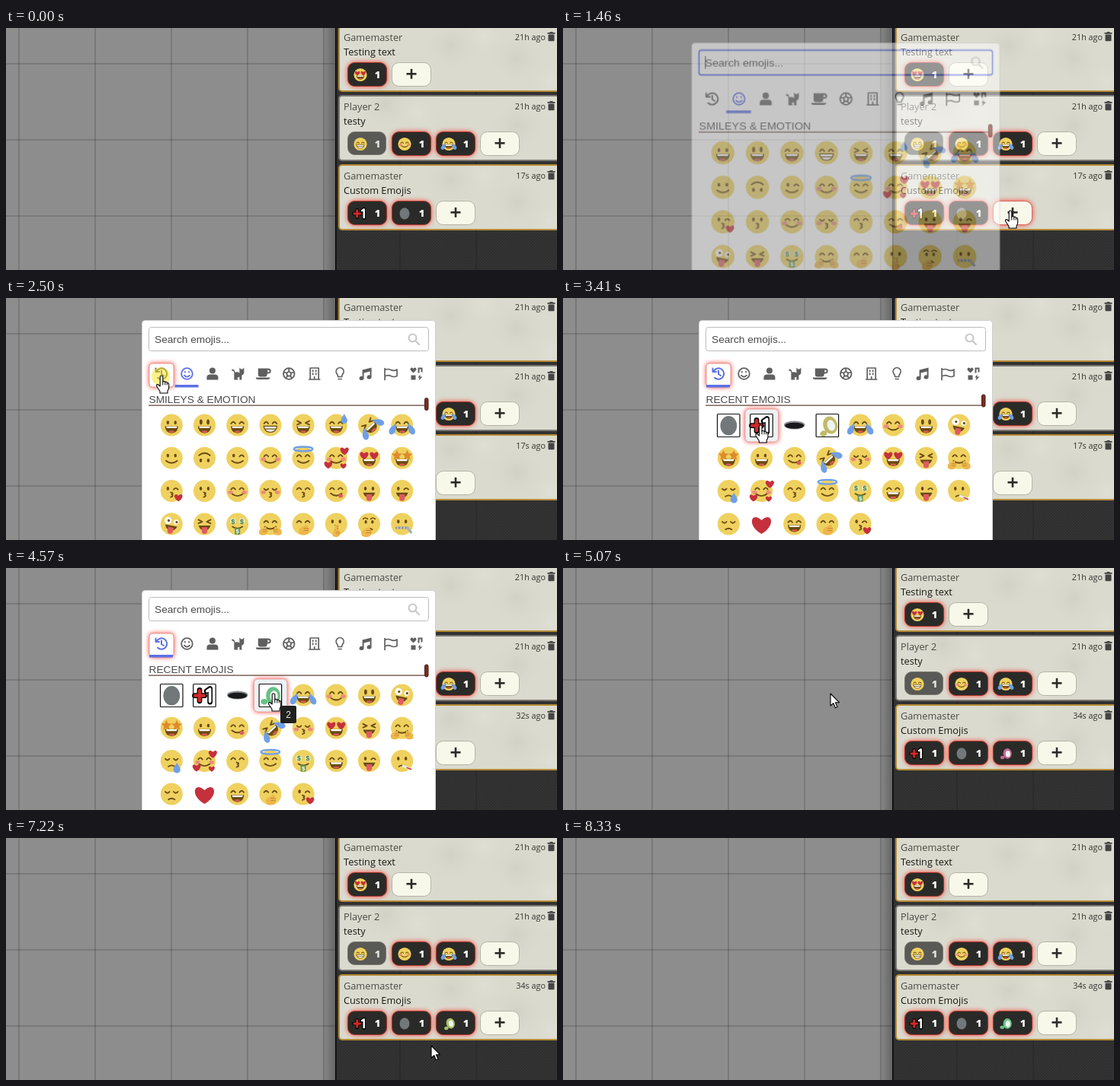
Recreate the animation shown at these times as an HTML page with a canvas. Size 723 px wide and 318 px high, loop 8.4 s.

```html
<!DOCTYPE html>
<html lang="en">
<head>
<meta charset="utf-8">
<title>Emoji reactions</title>
<style>
html, body { margin: 0; width: 100%; height: 100%; overflow: hidden; background: #8d8d8d; }
canvas { display: block; }
</style>
</head>
<body>
<canvas id="stage" width="723" height="318"></canvas>
<script>
const W = 723, H = 318, LOOP = 8400, TAU = Math.PI * 2;
const UI = '"Open Sans", "Noto Sans", sans-serif', ARIAL = '"Liberation Sans", Arial, sans-serif';
const BROWN = '#6a4b14', RED = '#c5303c', TEAR = '#6f9fe8', YELLOW = '#efd15f', BLUE = '#5c70e6';
const stage = document.getElementById('stage').getContext('2d');
const layer = newCanvas(W, H);
let g = stage, now = 0;

function newCanvas(w, h) {
  const ctx = document.createElement('canvas').getContext('2d');
  ctx.canvas.width = w;
  ctx.canvas.height = h;
  return ctx;
}

function text(s, x, y, font, color, align = 'left') {
  g.font = font;
  g.fillStyle = color;
  g.textAlign = align;
  g.fillText(s, x, y);
}

function rect(x, y, w, h, color) {
  g.fillStyle = color;
  g.fillRect(x, y, w, h);
}

function box(x, y, w, h, r, fill, line, lw = 1, glow = 0) {
  g.beginPath();
  g.roundRect(x, y, w, h, r);
  g.fillStyle = fill;
  g.shadowColor = '#ff2a1c';
  g.shadowBlur = glow;
  g.fill();
  g.shadowBlur = 0;
  if (line) {
    g.strokeStyle = line;
    g.lineWidth = lw;
    g.stroke();
  }
}

function disc(x, y, rx, ry, color) {
  g.beginPath();
  g.ellipse(x, y, rx, ry, 0, 0, TAU);
  g.fillStyle = color;
  g.fill();
}

function path(d, color, lw) {
  const p = new Path2D(d);
  g.lineWidth = lw;
  g.lineCap = g.lineJoin = 'round';
  if (lw) { g.strokeStyle = color; g.stroke(p); }
  else { g.fillStyle = color; g.fill(p, 'evenodd'); }
}

function at(x, y, s, draw) {
  g.save();
  g.translate(x, y);
  g.scale(s, s);
  draw();
  g.restore();
}

// ---- emojis, drawn in a unit circle ----

const arc = (x, y, w, h, lw = .13) => path(`M${x - w} ${y}Q${x} ${y + 2 * h} ${x + w} ${y}`, BROWN, lw);
const heart = (x, y, s) => at(x, y, s, () => path('M0 .9C-1.5 0-.9-1.3 0-.4C.9-1.3 1.5 0 0 .9Z', RED));
const drop = (x, y, s) => at(x, y, s, () => path('M0-1C.3-.4.7 0 .7.4A.7.7 0 0 1-.7.4C-.7 0-.3-.4 0-1Z', TEAR));
const hand = (x, y, s) => at(x, y, s, () => {
  path('M-.8.7Q-1.1-.1-.6-.4L.5-1Q.9-.9.6-.6L1-.3.9.2.7.7Q0 1.1-.8.7Z', '#eeb64c');
  path('M0-.3L.8-.3M0 .1L.8.1', '#b98222', .12);
});
const star = (x, y, s) => at(x, y, s, () =>
  path('M0-1L.3-.35 1-.3.45.2.6.9 0 .5-.6.9-.45.2-1-.3-.3-.35Z', '#df8a2b'));

const EYES = {
  d: s => disc(s * .34, -.22, .12, .17, BROWN),
  D: s => disc(s * .32, -.28, .13, .24, BROWN),
  h: s => arc(s * .38, -.14, .19, -.15),
  c: s => arc(s * .38, -.2, .19, .12),
  s: s => path(`M${s * .55}-.38L${s * .2}-.2 ${s * .55}-.05`, BROWN, .13),
  w: s => s < 0 ? EYES.d(s) : arc(.38, -.14, .19, -.12),
  H: s => heart(s * .45, -.25, .42),
  S: s => star(s * .47, -.25, .48),
  m: s => {
    disc(s * .4, -.25, .28, .28, '#dfe7bd');
    text('$', s * .4, -.02, `bold .6px ${ARIAL}`, '#3c7a3f', 'center');
  },
  z: s => {
    const r = s < 0 ? .33 : .23;
    disc(s * .37, -.25, r, r, '#fff');
    disc(s * .37 + .05, -.25, .11, .11, BROWN);
  },
  t: s => { disc(s * .3, -.18, .11, .15, BROWN); arc(s * .34, -.45, .2, -.1, .1); }
};

const MOUTHS = {
  O() {
    path('M-.6.1H.6Q.56.72 0 .74Q-.56.72-.6.1Z', BROWN);
    path('M-.5.12H.5L.44.28H-.44Z', '#fff');
    disc(0, .6, .26, .1, '#d95a4e');
  },
  g() {
    path('M-.6.1H.6Q.5.65 0 .65Q-.5.65-.6.1Z', '#fff');
    path('M-.6.1H.6Q.5.65 0 .65Q-.5.65-.6.1ZM-.5.36H.5', BROWN, .09);
  },
  s: () => arc(0, .25, .5, .2),
  k: () => path('M-.08.12Q.25.2 0 .32Q.25.45-.08.55', BROWN, .12),
  t() {
    path('M-.55.15H.55Q.4.6 0 .6Q-.4.6-.55.15Z', BROWN);
    path('M-.25.3H.25V.65A.25.25 0 0 1-.25.65Z', '#df5b62');
  },
  y() { arc(0, .22, .5, .2); disc(.4, .44, .2, .17, '#df5b62'); },
  f: () => arc(0, .5, .28, -.1),
  m() { arc(0, .25, .45, .15); path('M-.24.36H.24V.95H-.24Z', '#5d9656'); text('$', 0, .86, `bold .55px ${ARIAL}`, '#fff', 'center'); },
  z() { path('M-.5.35H.5', '#8c959d', .22); path('M-.4.28V.42M-.1.28V.42M.2.28V.42', '#eee', .07); path('M.5.35L.8.75', '#aab3bb', .25); },
  n() {}
};

const EXTRAS = {
  b: () => [-1, 1].forEach(s => disc(s * .63, .12, .23, .17, '#ec8b7c')),
  w: () => drop(.72, -.6, .42),
  T: () => [-1, 1].forEach(s => at(s * .78, .3, 1, () => { g.rotate(s * -.5); g.scale(.8, 1.1); drop(0, 0, .5); })),
  A() { g.beginPath(); g.ellipse(0, -.82, .85, .2, 0, 0, TAU); g.strokeStyle = TEAR; g.lineWidth = .16; g.stroke(); },
  L() { heart(-.72, .6, .4); heart(.75, -.65, .42); heart(.65, .7, .3); },
  K: () => heart(.62, .58, .4),
  H: () => [-1, 1].forEach(s => at(s * .65, .65, 1, () => { g.scale(-s, 1); hand(0, 0, .42); })),
  M: () => hand(.05, .55, .5),
  q: () => { path('M0 .95V.15', '#eeb64c', .22); hand(0, .85, .38); },
  C: () => hand(-.25, .75, .5),
  D: () => drop(.48, .6, .45),
  F() { path('M.1.45L.8.75', '#e8edf0', .2); path('M.45.6L.8.75', RED, .1); }
};

const SPECIAL = {
  blob: () => disc(0, .05, .75, .88, '#72787a'),
  plus() {
    path('M-.5-.5V.6M-1 .05H0', '#000', .52);
    path('M-.5-.45V.55M-.95.05H-.05', '#d02a2a', .34);
    path('M.2-.4L.55-.65V.7', '#000', .52);
    path('M.25-.4L.55-.6V.65', '#fff', .28);
  },
  hole() { disc(0, 0, .95, .38, '#8a8d90'); disc(0, .05, .85, .28, '#17191b'); },
  party() {
    const hue = 140 + (now - 4570) * 360 / 940, color = `hsl(${hue} 42% 58%)`;
    at(.1, 0, 1, () => {
      g.rotate(.3 * Math.sin((now - 4570) * TAU / 940));
      disc(.15, .05, .65, .8, color);
      disc(.22, .1, .35, .5, '#eef4ef');
      disc(-.65, .6, .32, .26, color);
    });
  },
  heart: () => heart(0, .05, .95)
};

function emoji(code, x, y, r) {
  at(x, y, r, () => {
    if (code[0] === '.') return SPECIAL[code.slice(1)]();
    const [eye, mouth, ...extras] = code;
    if (extras.includes('u')) g.rotate(Math.PI);
    if (extras.includes('r')) g.rotate(-.75);
    if (eye === 'z') g.rotate(.2);
    disc(0, 0, 1, 1, YELLOW);
    EYES[eye](-1);
    EYES[eye](1);
    MOUTHS[mouth]();
    extras.forEach(e => EXTRAS[e]?.());
  });
}

const grid = s => s.split('|').map(row => row.split(' '));
const SMILEYS = grid('dO DO hO hg sO hOw sOrT hOT|ds dsu ws hsb hsA hsbL HO SO|wkK dk hsb ckb hk hy dt wt|zt st mm hsH hnM dkq tfC dz');
const RECENT = grid('.blob .plus .hole .party hOT hsb DO zt|SO dO hy sOrT ckb HO st hsH|cfD hsbL hk hsA mm hO wt dfF|cf .heart hO hnM wkK');

// ---- category icons: path, line width (0 = filled) ----

const RING = 'M-7.3 0a7.3 7.3 0 1 0 14.6 0a7.3 7.3 0 1 0-14.6 0';
const ICONS = [
  ['M-6-4A7.2 7.2 0 1 1-5 5.2M-7.5-7V-2.5H-3M0-4V.5L3 2.5', 2],
  [RING + 'M-3.5 2.2Q0 6 3.5 2.2M-2.6-2.6v.6M2.6-2.6v.6', 1.8],
  ['M-4-4a4 4 0 1 0 8 0a4 4 0 1 0-8 0M-7.5 8V5Q-7.5 1-3 1H3Q7.5 1 7.5 5V8Z', 0],
  ['M-8-6Q-4-6-4-2Q0-3 2-1V-8L4-6H6L8-8V-2Q8 1 5 2V8H2V4L-2 6H0V8H-5V-1Q-5-4-8-4Z', 0],
  ['M-7-7H6Q10-7 10-3.5Q10 0 5 0Q5 4 2 4H-4Q-7 4-7 1ZM5.5-5V-2Q8-2 8-3.5Q8-5 5.5-5ZM-10 5H9Q8 7.5 6 7.5H-7Q-10 7.5-10 5Z', 0],
  [RING + 'M0-3L3-1 2 3H-2L-3-1ZM0-3V-7M3-1L7-2M2 3L4 6M-2 3L-4 6M-3-1L-7-2', 1.8],
  ['M-5.5 7.5V-7.5H5.5V7.5M-7 7.5H7M-2-4.5v1.5M2-4.5v1.5M-2-.5v1.5M2-.5v1.5M0 7V4', 1.7],
  ['M-2.5 4Q-2.5 2-4 0A5 5 0 1 1 4 0Q2.5 2 2.5 4ZM-2 7H2', 1.7],
  ['M-4-5L8-8V4.5a3 2.5 0 1 1-2-2.4V-3L-2-1V6a3 2.5 0 1 1-2-2.4Z', 0],
  ['M-8 8V-7M-8-5Q-4-7 0-5T8-5.5V3Q4 5 0 3T-8 3.5', 1.7],
  ['M-4-1L-8-5Q-8-8-6-8Q-4-8-4-6Q-4-8-2-8Q0-8 0-5ZM2-8H8V-2H6V-6H4V-1H2ZM-7 2H-1V8H-7ZM5 1L2 5H4L3 9 8 4H5Z', 0]
];

// ---- pointer ----

const MOVES = [[470, 650, 322], [1050, 587, 240], [1600, 587, 240], [2250, 204, 102], [2640, 204, 102],
  [3070, 256, 167], [3350, 256, 167], [3900, 351, 165], [5100, 351, 165], [5760, 558, 273],
  [7640, 558, 273], [7760, 594, 278]];

function pointerAt(t) {
  const i = MOVES.findIndex(m => m[0] > t);
  if (i < 1) return null;
  const [t0, x0, y0] = MOVES[i - 1], [t1, x1, y1] = MOVES[i];
  const u = (t - t0) / (t1 - t0), k = u * u * (3 - 2 * u);
  return { x: x0 + (x1 - x0) * k, y: y0 + (y1 - y0) * k };
}

const inside = (p, x, y, w, h) => p && p.x > x && p.x < x + w && p.y > y && p.y < y + h;

function drawPointer(p, isHand) {
  const d = isHand
    ? 'M-1.8 1Q0-1 1.8 1V8Q3.5 6.5 4.8 8.5Q6.5 7.5 7.4 9.5Q9.5 9 9.7 11.5V16Q9.5 18 8 20V23H-2V20.5L-6.3 14Q-7 11.5-4.8 11.5L-1.8 14Z'
    : 'M0 0V16L3.8 12.6 6.4 18.7 9 17.6 6.4 11.7H11.4Z';
  at(p.x, p.y, 1, () => {
    path(d, '#fff', 0);
    path(d, '#000', 1.1);
    if (isHand) path('M1.8 8v4M4.8 9v3M7.4 10v2', '#000', 1);
  });
}

// ---- chat sidebar ----

const weave = newCanvas(4, 4);
weave.fillStyle = '#333';
weave.fillRect(0, 0, 4, 4);
weave.fillStyle = '#2b2b2b';
for (let i = 0; i < 4; i++) weave.fillRect(i, 3 - i, 1, 1);

function shade(x0, x1, from, to) {
  const grad = g.createLinearGradient(x0, 0, x1, 0);
  grad.addColorStop(0, from);
  grad.addColorStop(1, to);
  rect(x0, 0, x1 - x0, H, grad);
}

function backdrop() {
  rect(0, 0, W, H, '#8d8d8d');
  for (let x = 16; x < 433; x += 100) rect(x, 0, 2, H, 'rgba(0,0,0,.14)');
  for (let y = 46; y < H; y += 100) rect(0, y, 433, 2, 'rgba(0,0,0,.14)');
  shade(414, 432, 'rgba(0,0,0,0)', 'rgba(0,0,0,.28)');
  rect(433, 0, W - 433, H, g.createPattern(weave.canvas, 'repeat'));
  rect(516, 0, 2, H, 'rgba(0,0,0,.12)');
  rect(616, 0, 2, H, 'rgba(0,0,0,.12)');
  rect(432, 0, 1.5, H, '#060606');
}

function trash(x, y) {
  rect(x, y + 1, 10, 1.8, '#444');
  rect(x + 3, y, 4, 1.5, '#444');
  box(x + 1, y + 3.6, 8, 8.6, 1, '#444');
}

function card(y, name, body, age, line, pills, pointer) {
  box(437, y + 1, 300, 85, 4, '#dbdacf', line, 2);
  g.save();
  g.clip();
  for (let i = 0; i < 7; i++) {
    const x = 455 + i * 43, cy = y + 43 + 32 * Math.sin(i * 5 + y), r = 34;
    const spot = g.createRadialGradient(x, cy, 0, x, cy, r);
    spot.addColorStop(0, i % 2 ? 'rgba(120,118,95,.09)' : 'rgba(255,255,250,.12)');
    spot.addColorStop(1, 'rgba(200,200,185,0)');
    rect(x - r, cy - r, 2 * r, 2 * r, spot);
  }
  g.restore();
  text(name, 443, y + 20, `12.75px ${UI}`, '#4b4a45');
  text(body, 443, y + 39, `12.75px ${UI}`, '#191813');
  text(age, 708, y + 19, `10.8px ${UI}`, '#33322e', 'right');
  trash(710.5, y + 8);
  let x = 448.5;
  const top = y + 48.5;
  for (const code of pills) {
    const muted = code[0] === '-';
    if (muted) box(x, top, 50, 30, 9, '#595955', '#77766f');
    else box(x, top, 51, 31, 9, '#2a2b28', '#a8352d', 1, 6);
    emoji(code.replace('-', ''), x + 16.5, top + 16, 8.6);
    text('1', x + 39, top + 20.5, `800 13px ${UI}`, muted ? '#e2e2de' : '#fff', 'center');
    x += 58;
  }
  const hover = inside(pointer, x, top, 51, 31);
  box(x, top, 51, 31, 9, '#f8f8ea', hover ? '#d9665c' : '#b5b3a4', 1, hover ? 7 : 0);
  rect(x + 19, top + 13.5, 13, 2.6, '#2b2b28');
  rect(x + 24.2, top + 8.3, 2.6, 13, '#2b2b28');
  return hover;
}

function chat(t, pointer) {
  const gold = '#b58a34', age = t < 3500 ? '17s ago' : t < 4930 ? '32s ago' : '34s ago';
  card(-3, 'Gamemaster', 'Testing text', '21h ago', gold, ['HO'], pointer);
  card(88, 'Player 2', 'testy', '21h ago', '#777671', ['-hg', 'hsb', 'hOT'], pointer);
  const pills = ['.plus', '.blob'];
  if (t >= 4930) pills.push('.party');
  return card(179, 'Gamemaster', 'Custom Emojis', age, gold, pills, pointer);
}

// ---- emoji picker ----

const CELL = 43.2;

function picker(t, pointer) {
  const recent = t >= 2680, focused = t < 2430;
  box(178.5, 29.5, 385, 420, 4, '#fff', '#cfcfcf');
  box(187.5, 38.5, 367, 31, 3, '#fff', focused ? BLUE : '#bdbdbd', focused ? 1.8 : 1);
  text('Search emojis...', 195, 59, `13.7px ${ARIAL}`, '#4a4a4a');
  if (focused) rect(195, 46, 1, 16, '#222');
  at(535, 54, 1, () => path('M-6.5-1.5a5 5 0 1 0 10 0a5 5 0 1 0-10 0M2.5 2.5L7 7', '#c9c9c9', 2.2));

  if (t > 2230 && t < 4790) box(188, 86, 32, 31, 4, '#fff', '#e39a94', 1, 6);
  const active = recent ? 0 : 1;
  rect(188 + active * 33.5, 114, 31, 3.5, BLUE);
  ICONS.forEach(([d, lw], i) =>
    at(204 + i * 33.45, 99.5, 1, () => path(d, i === active ? BLUE : '#5f5f5f', lw)));

  text(recent ? 'RECENT EMOJIS' : 'SMILEYS & EMOTION', 187.5, 138, `13.7px ${ARIAL}`, '#4c4c4c');
  rect(187, 140.5, 362, 1.2, '#5c3a34');
  box(549.5, recent ? 127 : 131.5, 4.5, 16, 2, '#782e22', '#4d1d16');

  const col = Math.round(((pointer?.x ?? 0) - 217.5) / CELL);
  if (recent && inside(pointer, 196, 146, 345, 43))
    box(195.8 + col * CELL, 146, 43.5, 43, 5, '#edf1f5', '#e8a7a2', 1, 6);
  (recent ? RECENT : SMILEYS).forEach((row, r) => row.forEach((code, c) => {
    const x = 217.3 + c * CELL, y = 167 + r * 43.3;
    if (/blob|plus|party/.test(code)) box(x - 14.8, y - 14.5, 29.5, 30, 1, '#fff', '#111', 1.2);
    emoji(code, x, y, code === '.plus' ? 13 : 14.5);
  }));
  if (t > 4000) {
    box(360, 181, 21, 23, 2, '#20211f');
    text('2', 370.5, 197, `12px ${ARIAL}`, '#eee', 'center');
  }
}

function drawPicker(t, pointer) {
  g = layer;
  g.clearRect(0, 0, W, H);
  picker(t, pointer);
  g = stage;
  const s = 1 + .05 * Math.max(0, Math.min(1, (1540 - t) / 80));
  g.save();
  g.globalAlpha = Math.min(1, (t - 1390) / 140);
  g.translate(371, 229);
  g.scale(s, s);
  g.drawImage(layer.canvas, -371, -229);
  g.restore();
}

function render(time) {
  const t = now = time % LOOP, pointer = pointerAt(t), open = t >= 1390 && t < 4930;
  backdrop();
  const overButton = chat(t, pointer);
  if (open) drawPicker(t, pointer);
  if (pointer) {
    const clicking = (t > 2430 && t < 2620) || (t > 4720 && t < 4900);
    if (clicking) disc(pointer.x - 1, pointer.y + 1, 12, 12, 'rgba(250,230,40,.55)');
    const overPicker = open && (inside(pointer, 187, 84, 365, 34) || inside(pointer, 196, 146, 345, 172));
    drawPointer(pointer, overButton || overPicker);
  }
}

const start = performance.now();
(function frame() {
  render(performance.now() - start);
  requestAnimationFrame(frame);
})();
</script>
</body>
</html>
```
